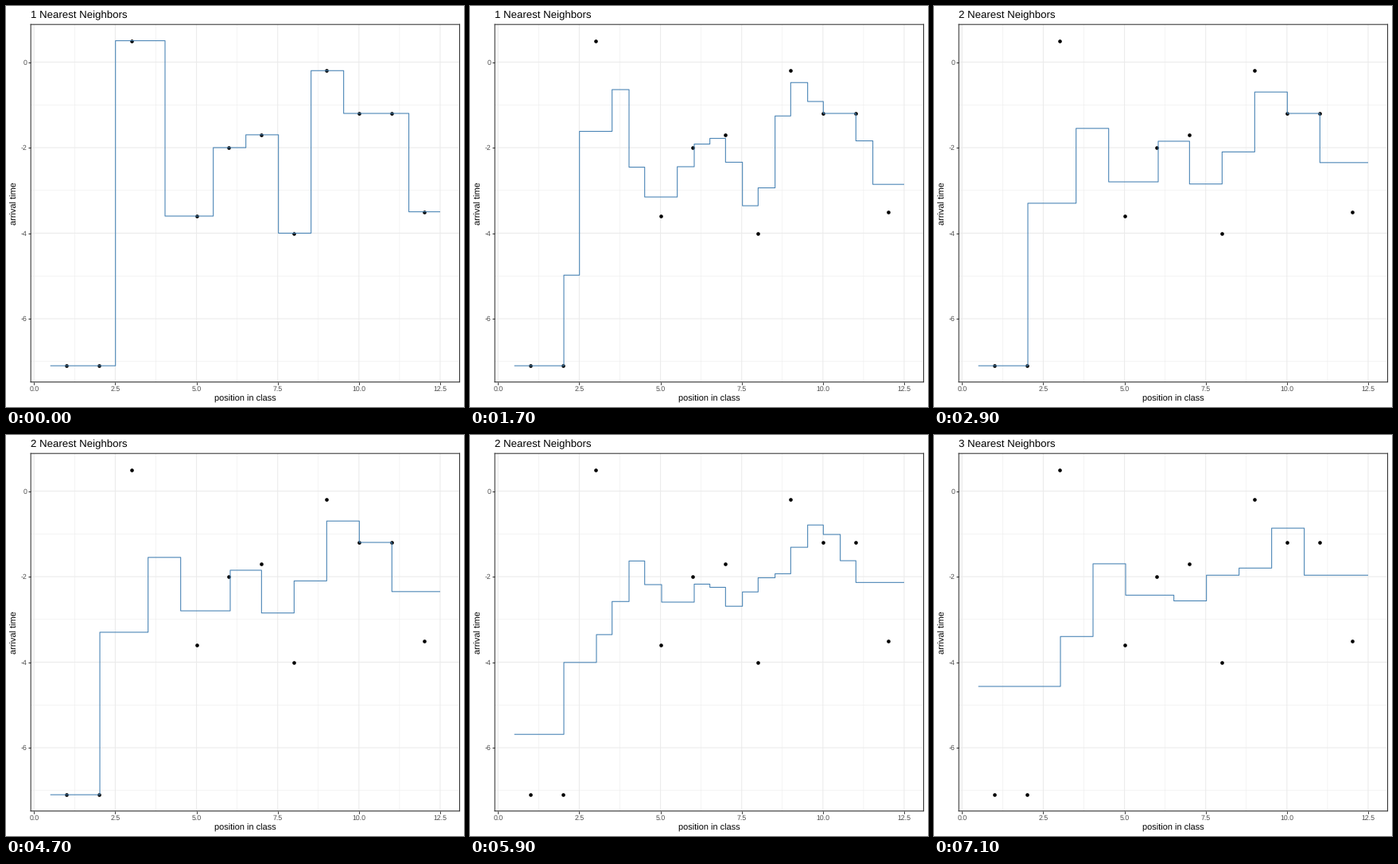
Animation, 576 px wide and 504 px high, one loop 8000 ms. Source, as a matplotlib script:

```python
import numpy as np
import matplotlib.pyplot as plt
from matplotlib.animation import FuncAnimation

W, H, DPI = 576, 504, 72
LEFT, RIGHT, TOP, BOTTOM = 31.2, 570.5, 23.2, 472.6
XLIM, YLIM = (-0.1, 13.1), (-7.48, 0.88)
STEP_MS, FRAMES = 100, 80
CYCLE, MOVE, SWITCH = 42, 25, 14   # frames per state, per move, until the title flips

plt.rcParams.update({"font.family": "Liberation Sans", "text.hinting": "none"})

x = np.array([1, 2, 3, 5, 6, 7, 8, 9, 10, 11, 12])
y = np.array([-7.1, -7.1, 0.5, -3.6, -2, -1.7, -4, -0.2, -1.2, -1.2, -3.5])
grid = np.linspace(0.5, 12.5, 300)


def knn(k):
    order = np.argsort(np.abs(grid[:, None] - x), axis=1, kind="stable")
    return y[order[:, :k]].mean(axis=1)


def ease(t):
    return 4 * t**3 if t < 0.5 else 1 - 4 * (1 - t) ** 3


fits = [knn(max(k, 1)) for k in range(4)]

fig = plt.figure(figsize=(W / DPI, H / DPI), dpi=DPI, facecolor="white")
ax = fig.add_axes([LEFT / W, 1 - BOTTOM / H, (RIGHT - LEFT) / W, (BOTTOM - TOP) / H])
ax.set(xlim=XLIM, ylim=YLIM)
ax.set_axisbelow(True)

xticks, yticks = np.arange(0, 13, 2.5), np.arange(-6, 1, 2)
ax.set_xticks(xticks)
ax.set_yticks(yticks)
ax.set_xticks(np.arange(1.25, 13, 2.5), minor=True)
ax.set_yticks(np.arange(-7, 0, 2), minor=True)
ax.tick_params(length=2.75, width=1.07, color="#333333",
               labelbottom=False, labelleft=False)
ax.tick_params(which="minor", length=0)
ax.grid(which="minor", color="#ebebeb", lw=0.53)
ax.grid(which="major", color="#ebebeb", lw=1.07)
for spine in ax.spines.values():
    spine.set(color="#333333", linewidth=1.07, snap=False)
for axis in (ax.xaxis, ax.yaxis):
    for tick in axis.get_major_ticks() + axis.get_minor_ticks():
        for part in (tick.gridline, tick.tick1line):
            part.set_snap(False)


def label(px, py, text, size, color="black", ha="center", **kw):
    """Text with its baseline at pixel (px, py), measured from the top left."""
    return fig.text(px / W, 1 - py / H, text, fontsize=size, color=color,
                    ha=ha, va="baseline", **kw)


for v in xticks:
    px = LEFT + (v - XLIM[0]) / (XLIM[1] - XLIM[0]) * (RIGHT - LEFT)
    label(px, 483.9, f"{v:.1f}", 8.8, "#4d4d4d")
for v in yticks:
    py = TOP + (YLIM[1] - v) / (YLIM[1] - YLIM[0]) * (BOTTOM - TOP)
    label(26.3, py + 3.15, str(v), 8.8, "#4d4d4d", "right")

label((LEFT + RIGHT) / 2, 496.4, "position in class", 11)
label(13.4, (TOP + BOTTOM) / 2, "arrival time", 11, rotation=90, rotation_mode="anchor")
title = label(LEFT, 15, "", 13.2, ha="left")

ax.plot(x, y, "o", color="black", ms=4.6, mew=0, zorder=3, snap=False)
line, = ax.plot(grid, fits[1], color="steelblue", lw=1.07, zorder=4, snap=False,
                drawstyle="steps-post", solid_capstyle="butt", solid_joinstyle="round")


def update(i):
    k, n = divmod(i + CYCLE - 4, CYCLE)
    t = ease(min(n / MOVE, 1))
    line.set_ydata(fits[k] + (fits[k + 1] - fits[k]) * t)
    title.set_text(f"{k + (n >= SWITCH)} Nearest Neighbors")
    return line, title


anim = FuncAnimation(fig, update, frames=FRAMES, interval=STEP_MS,
                     repeat=True, repeat_delay=0, blit=False)
plt.show()
```
